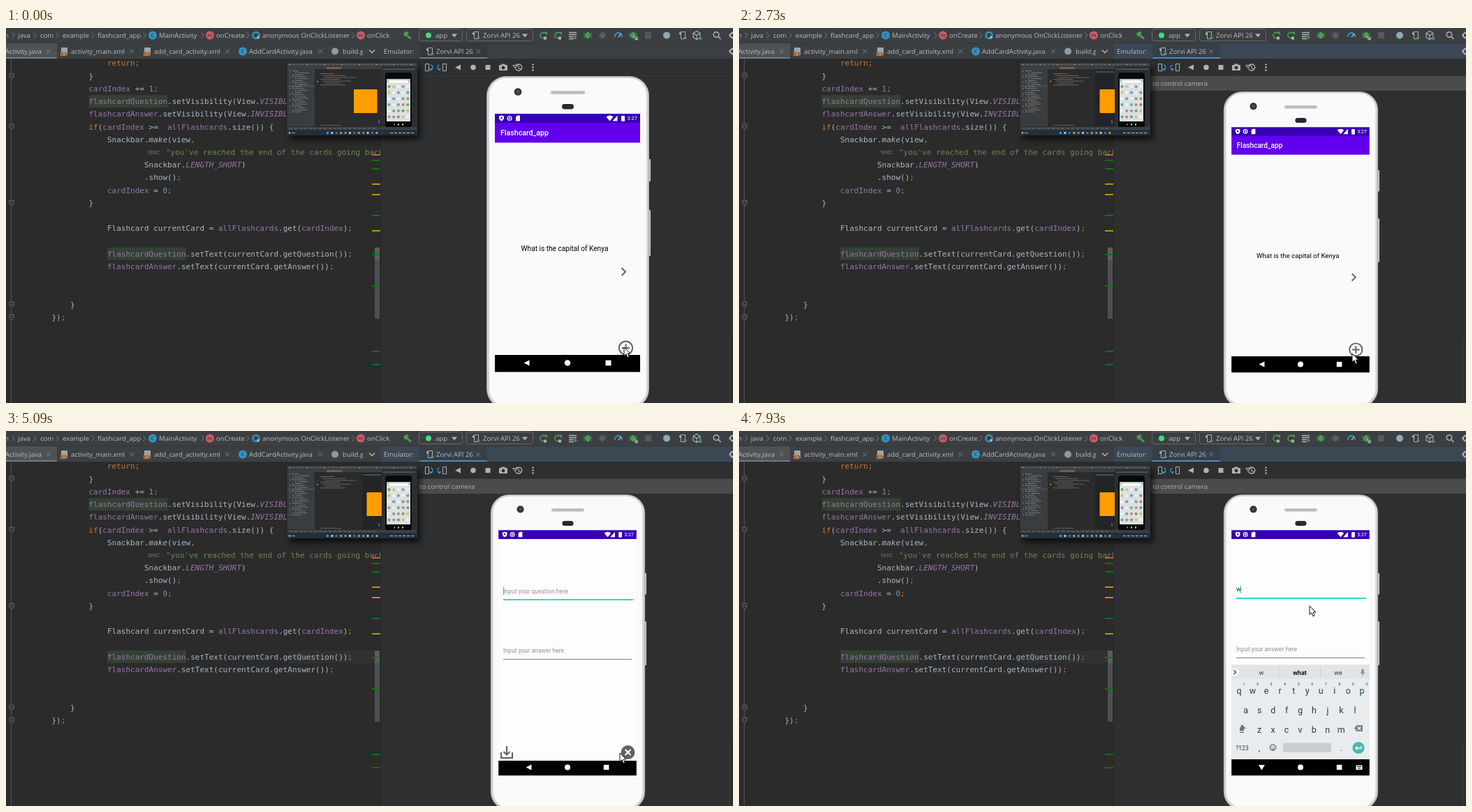
Write an HTML page with a canvas that moves like this. It is 1041 px wide and 538 px high and loops after 8 s.

```html
<!DOCTYPE html>
<html lang="en">
<head>
<meta charset="utf-8">
<style>
html, body { margin: 0; width: 100%; height: 100%; overflow: hidden; background: #2b2b2b; }
canvas { display: block; }
</style>
</head>
<body>
<canvas id="stage" width="1041" height="538"></canvas>
<script>
const c = document.getElementById('stage').getContext('2d');
const UI = '"Open Sans", sans-serif', MONO = '"DejaVu Sans Mono", monospace', APP = 'Roboto, sans-serif';
const LOOP = 8000, DEVICE = 'Zorvi API 26';
const GREY = '#afb1b3', GREEN = '#499c54', BLUE = '#3592c4';

// Held poses: [time, ...values]
const CURSOR = [[0, 885, 458], [1580, 765, 326], [1730, 739, 264], [1880, 738, 244], [2280, 750, 290],
  [2430, 790, 330], [2580, 845, 400], [2730, 878, 467], [2880, 879, 462], [5240, 872, 440],
  [5380, 853, 390], [5520, 833, 330], [5660, 822, 290], [5800, 818, 270], [5930, 817, 263], [6220, 817, 251]];
const FORM = [[4940, 8, .6], [5090, 2, 1], [5240, 0, 1]];
const KEYS = [[6830, 36, .25], [6950, 14, .65], [7100, 2, .95], [7250, 0, 1]];
const held = (list, t) => list.filter(k => k[0] <= t).pop();

function rect(x, y, w, h, color, r = 0) {
  c.fillStyle = color;
  c.beginPath(); c.roundRect(x, y, w, h, r); c.fill();
}
function frame(x, y, w, h, color, r = 0, lw = 1) {
  c.strokeStyle = color; c.lineWidth = lw;
  c.beginPath(); c.roundRect(x, y, w, h, r); c.stroke();
}
function dot(x, y, r, color) {
  c.fillStyle = color;
  c.beginPath(); c.arc(x, y, r, 0, 7); c.fill();
}
function ring(x, y, r, color, lw = 1, from = 0, to = 7) {
  c.strokeStyle = color; c.lineWidth = lw;
  c.beginPath(); c.arc(x, y, r, from, to); c.stroke();
}
// SVG path placed at x, y; stroked when lw is given
function shape(d, x, y, color, lw) {
  const p = new Path2D();
  p.addPath(new Path2D(d), new DOMMatrix([1, 0, 0, 1, x, y]));
  c.lineWidth = lw || 1;
  c.fillStyle = c.strokeStyle = color;
  lw ? c.stroke(p) : c.fill(p);
}
// y is the middle of the capitals
function text(s, x, y, size, color, font = UI, style = '', align = 'left') {
  c.font = `${style} ${size}px ${font}`;
  c.textAlign = align;
  c.fillStyle = color;
  c.fillText(s, x, y + size * .36);
  return c.measureText(s).width;
}
const label = (s, x, y, color = '#bbbbbb') => text(s, x, y, 9.6, color);
const cross = (x, y) => shape('M-3-3L3 3M3-3L-3 3', x, y, '#7f8283', 1);
function badge(ch, x, y, color) {
  dot(x, y, 6, color);
  text(ch, x, y, 8, '#2b2b2b', UI, '', 'center');
}
function phoneIcon(x, y) {
  frame(x - 2.5, y - 5, 6, 10, GREY);
  rect(x - 5, y - 4, 3, 3, GREY);
  dot(x + 3.5, y + 3.5, 2, GREEN);
}
function reload(x, y) {
  ring(x, y, 4, GREEN, 1.6, 1, 5.4);
  shape('M1-5L6-5L6 0Z', x, y, GREEN);
  rect(x + 1, y + 2, 4, 4, GREY);
}
function bug(x, y, color) {
  c.fillStyle = color;
  c.beginPath(); c.ellipse(x, y, 3.4, 4.8, 0, 0, 7); c.fill();
  shape('M-6-3L6 3M-6 0H6M-6 3L6-3', x, y, color, 1);
}
function gear(x, y) {
  ring(x, y, 3.2, GREY, 2);
  shape('M-5 0H-3M3 0H5M0-5V-3M0 3V5', x, y, GREY, 1.5);
}

const TINT = { d: '#a9b7c6', p: '#9876aa', k: '#cc7832', n: '#6897bb', s: '#6a8759', i: '#a9b7c6', c: '#9876aa' };
// [row, x, text]; "~" plus a letter switches the tint
const CODE = [
  [0, 145, '~kreturn;'], [1, 118.5, '~d}'], [2, 118.5, '~pcardIndex~d += ~n1~k;'],
  [3, 118.5, '~pflashcardQuestion~d.setVisibility(View.~cVISIBLE~d)'],
  [4, 118.5, '~pflashcardAnswer~d.setVisibility(View.~cINVISIBLE~d)'],
  [5, 118.5, '~kif~d(~pcardIndex~d >=  ~pallFlashcards~d.size()) {'],
  [6, 145, '~dSnackbar.~imake~d(view~k,'],
  [7, 229, '~s"you\'ve reached the end of the cards going back'],
  [8, 198, '~dSnackbar.~cLENGTH_SHORT~d)'], [9, 198, '~d.show()~k;'],
  [10, 145, '~pcardIndex~d = ~n0~k;'], [11, 118.5, '~d}'],
  [13, 145, '~dFlashcard currentCard = ~pallFlashcards~d.get(~pcardIndex~d)~k;'],
  [15, 145, '~pflashcardQuestion~d.setText(currentCard.getQuestion())~k;'],
  [16, 145, '~pflashcardAnswer~d.setText(currentCard.getAnswer())~k;'],
  [19, 92, '~d}'], [20, 65.5, '~d})~k;']];
const rowY = r => 50.5 + 18.22 * r;

function editor(t) {
  rect(0, 44, 537, 494, '#2b2b2b');
  c.save();
  c.beginPath(); c.rect(0, 44, 536, 494); c.clip();
  if (t >= 3840) rect(405, 315, 123, 18, '#313131');
  rect(7, 44, 1, 494, '#505254');
  for (const r of [1, 5, 11, 19, 20]) {
    rect(4, rowY(r) - 4, 8, 8, '#2b2b2b');
    shape('M-3-3.5H3V1.5L0 4L-3 1.5ZM-1.5 0H1.5', 8, rowY(r), '#6b6d6f', 1);
  }
  rect(118.5, rowY(3) - 9, 113, 18, '#344134');
  rect(145, rowY(15) - 9, 113, 18, '#344134');
  for (const [row, left, line] of CODE) {
    let x = left;
    for (const part of line.split('~').slice(1))
      x += text(part.slice(1), x, rowY(row), 11, TINT[part[0]], MONO, 'ic'.includes(part[0]) ? 'italic' : '');
  }
  text('text:', 203, rowY(7), 8.8, '#787878');
  rect(528, 315, 7, 102, '#4d4f50');
  rect(528, 315, 7, 18, '#5b5d5e');
  c.restore();
  const mark = (ys, color) => ys.forEach(y => rect(524, y - 1, 12, 2, color));
  mark([190, 202, 269, 325, 370, 464, 483], '#0d730f');
  mark([224, 239, 291], '#b8901c');
  mark([182], '#b5653c');
}

function topBars(focused) {
  rect(0, 0, 1041, 44, '#3c3f41');
  rect(0, 21.5, 1041, 1, '#323435');
  const y = 10.5;
  for (const [s, x] of [['n', -2], ['java', 17], ['com', 49], ['example', 81], ['flashcard_app', 131],
    ['MainActivity', 219], ['onCreate', 301], ['anonymous OnClickListener', 367], ['onClick', 517]]) label(s, x, y);
  for (const x of [10, 41, 73, 124, 198, 281, 346, 497]) shape('M-1.5-4L2 0L-1.5 4', x, y, '#7b7e80', 1);
  badge('C', 210, y, BLUE);
  badge('m', 292, y, '#c75d6d');
  badge('m', 508, y, '#c75d6d');
  ring(358, y, 4.5, BLUE, 2.5);
  dot(361, y + 3, 2, '#9fb8c8');

  shape('M-6-3L-1-6L2-3L0-1L6 4L4 6L-2 1L-4 2Z', 575, y, GREEN);
  frame(591.5, 1.5, 62, 17, '#646769', 3);
  dot(605, 10.5, 4, '#3ddc84');
  label('app', 615, y);
  frame(659.5, 1.5, 95, 17, '#646769', 3);
  phoneIcon(673, y);
  label(DEVICE, 683, y);
  for (const x of [642, 743]) shape('M-4-2H4L0 3Z', x, y, GREY);
  reload(769, y);
  reload(790, y);
  shape('M-6-4H5M-6-1H5M-6 2H1M-6 5H1', 812, y, GREY, 1.3);
  shape('M2 0L6 3L2 6Z', 812, y, GREEN);
  bug(833, y, GREEN);
  bug(854, y, '#5b5e60');
  ring(877, 12, 5, BLUE, 2, 3, 6.5);
  shape('M0 1L4-4', 877, 12, GREY, 1.5);
  bug(898, y, GREEN);
  shape('M1 1L6 6M6 2V6H2', 898, y, GREY, 1.3);
  rect(915, 6, 9, 9, '#56595b');
  dot(946, y, 5, '#8fa9b8');
  phoneIcon(969, y);
  shape('M0-6L5-3V3L0 6L-5 3V-3ZM-5-3L0 0L5-3M0 0V6', 989, y, GREY, 1.1);
  shape('M3 1V6M1 4L3 6L6 4', 991, y, BLUE, 1.5);
  ring(1017, 9.5, 3.8, GREY, 1.5);
  shape('M0 0L4 4', 1019.5, 12, GREY, 1.7);
  gear(1040, y);

  const ty = 33.5;
  rect(0, 22, 73, 22, '#4e5254');
  rect(0, 42, 73, 2, '#747a80');
  if (focused) rect(537, 22, 504, 22, '#3b4754');
  rect(592, 22, 97, 22, focused ? '#354049' : '#36393b');
  rect(592, 42, 97, 2, focused ? '#4a88c7' : '#747a80');
  for (const [s, x] of [['Activity.java', -1], ['activity_main.xml', 93], ['add_card_activity.xml', 212],
    ['AddCardActivity.java', 348], ['build.g', 482], ['Emulator:', 541]]) label(s, x, ty);
  for (const x of [61, 180, 317, 450]) cross(x, ty);
  for (const x of [83, 202]) {
    rect(x - 4, 28, 9, 11, '#9aa7b0');
    rect(x - 5, 34, 8, 6, '#c77b3c');
    shape('M-2-2L-4 0L-2 2M2-2L4 0L2 2', x, 37, '#3c3f41', 1);
  }
  badge('C', 339, ty, BLUE);
  dot(471, ty, 5, '#8b9ba4');
  rect(511, 23, 26, 21, '#3c3f41');
  shape('M-4-2L0 2L4-2', 524, ty, '#bbbbbb', 1.4);
  phoneIcon(607, ty);
  label(DEVICE, 616, ty);
  cross(676, ty);
  gear(1040, ty);
}

function emulatorPanel(zoomed) {
  rect(537, 44, 504, 494, '#2d2f31');
  rect(536, 44, 1, 494, '#252728');
  rect(537, 68, 504, 1, '#353739');
  const y = 56.5;
  for (const [x, s] of [[604, 1], [625, -1]]) {
    frame(x - 1.5 + s * -2, 51.5, 5, 10, GREY);
    ring(x + s * 3, y, 4, BLUE, 1.4, s > 0 ? -1.2 : 2, s > 0 ? 1.2 : 4.3);
    shape('M-2-2H2L0 2Z', x + s * 4, 60, BLUE);
  }
  shape('M-4 0L4-4V4Z', 647, y, GREY);
  dot(669, y, 3.8, GREY);
  rect(686.5, 53, 7, 7, GREY);
  rect(706, 53, 12, 8, GREY, 1);
  rect(709.5, 51.5, 5, 3, GREY);
  dot(712, 57, 2.4, '#2d2f31');
  ring(734, y, 4.6, GREY, 1.5, -2.7, 2.7);
  shape('M-8-3L-2-3L-5 1ZM0-3V1L3 2', 734, y, GREY, 1.1);
  for (const d of [-4, 0, 4]) dot(754.5, y + d, 1.3, GREY);
  rect(1036, 445, 1, 93, '#3b3d3f');
  if (zoomed) {
    rect(537, 69, 504, 21, '#494b4c');
    label('to control camera', 592, 80, '#b4b6b7');
  }
}

function statusBar() {
  rect(700, 123, 208, 13.5, '#3700b3');
  shape('M0-4L3.5-3V0Q3 3 0 4Q-3 3-3.5 0V-3Z', 709.5, 129.5, '#fff');
  dot(709.5, 129, 1.3, '#3700b3');
  ring(721, 129.5, 3, '#fff', 1.2);
  dot(721, 129.5, 1.3, '#fff');
  shape('M-1-4H3V4H-3V-2Z', 733, 129.5, '#fff');
  shape('M-5-2Q0-6 5-2L0 4Z', 864.5, 129.5, '#fff');
  shape('M3-4V4H-4Z', 872.5, 129.5, '#fff');
  rect(881, 126, 5, 8, '#fff', 1);
  text('3:27', 889.5, 129.7, 7.6, '#fff', APP);
}

function phone(t) {
  // body
  rect(920, 188, 3, 32, '#c9c7c8', 1);
  rect(920, 261, 3, 66, '#c9c7c8', 1);
  rect(688, 69, 233, 477, '#a5a1a3', 28);
  rect(689, 70, 231, 475, '#d6d3d4', 27);
  rect(692, 72, 225, 470, '#fafafa', 24);
  dot(733, 91.5, 5.3, '#2b2b2d');
  ring(733, 91.5, 3, '#55565a');
  dot(733, 91.5, 1.2, '#777');
  rect(779.5, 90, 50, 5, '#c9c8c9', 2.5);
  for (let x = 783; x < 828; x += 3) rect(x, 91.5, 1.5, 2, '#a5a3a5');
  rect(796, 109, 17, 7.5, '#2a2a2c', 3.7);
  // main screen
  rect(700, 123, 208, 346, t < 3320 ? '#fafafa' : '#fdfdfd');
  statusBar();
  rect(700, 469, 208, 24.4, '#000');
  if (t >= 5090) return;
  rect(700, 136, 208, 28.5, '#6200ee');
  text('Flashcard_app', 708, 150.3, 10.6, '#fff', APP, '500');
  if (t < 3320) text('What is the capital of Kenya', 800, 316.5, 10.15, '#000', APP, '', 'center');
  else text('Nairobi', 804, 323.5, 10.15, '#000', APP, '', 'center');
  shape('M-3-5.5L2.5 0L-3 5.5', 884.5, 349.7, '#6b6b6b', 2.2);
  ring(887.5, 459, 9.6, '#616161', 2);
  shape('M-5.5 0H5.5M0-5.5V5.5', 887.5, 459, '#616161', 2);
}

function form(t) {
  const [, dy, alpha] = held(FORM, t);
  const typed = t >= 6830;
  c.save();
  c.beginPath(); c.rect(705, 155, 198, 316 + dy); c.clip();
  c.globalAlpha = alpha;
  rect(705, 155, 198, 330, '#fdfdfd');
  c.translate(0, dy);
  if (typed) text('w', 712, 226.5, 9, '#222', APP);
  else text('Input your question here', 712, 227.5, 8.65, '#8f8f8f', APP);
  if (t < 7540 || t >= 7930) rect(typed ? 718 : 712, 221.5, 1, 11.5, '#03dac5');
  rect(712, 239, 186, 2, '#2fd8cb');
  text('Input your answer here', 712, 313, 8.65, '#8f8f8f', APP);
  rect(712, 325, 184, 1, '#808080');
  shape('M-8 0V8H8V0M0-9V3M-4.5-1L0 3.5L4.5-1', 717, 459, '#616161', 2);
  dot(890.5, 459, 10, '#616161');
  shape('M-4-4L4 4M4-4L-4 4', 890.5, 459, '#fff', 2);
  c.restore();
}

function keyboard(t) {
  const [, dy, alpha] = held(KEYS, t), ink = '#303b41', sliding = dy > 2;
  c.save();
  c.beginPath(); c.rect(705, 155, 198, 338.5); c.clip();
  c.globalAlpha = alpha;
  c.translate(0, dy);
  rect(705, 335.5, 198, 135.5, sliding ? '#fafbfc' : '#e8ecef');
  rect(705, 335.5, 198, 20, sliding ? '#e6e8e9' : '#e1e4e6');
  dot(710, 346, 6, '#f6f7f8');
  shape('M-1.5-3L1.5 0L-1.5 3', 710, 346, ink, 1.2);
  const key = (s, x, y, size = 12.5, style = '') => text(s, x, y, size, ink, APP, style, 'center');
  key('w', 748, 346.5, 9);
  text('what', 803, 346.5, 9, '#111', APP, 'bold', 'center');
  key('we', 858, 346.5, 9);
  rect(774, 340, 1, 12, '#c9ced1');
  rect(832, 340, 1, 12, '#c9ced1');
  rect(891.5, 341.5, 3, 6, '#78828a', 1.5);
  shape('M-3 0Q0 5 3 0M0 3V5', 893, 346, '#78828a', 1);
  [['qwertyuiop', 716, 371], ['asdfghjkl', 725.6, 399], ['zxcvbnm', 745, 427]].forEach(([row, x, y]) =>
    [...row].forEach((ch, i) => key(ch, x + i * 19.55, y + 1)));
  for (let i = 0; i < 10; i++) key((i + 1) % 10, 723 + i * 19.55, 363, 5.5);
  shape('M0-6L6 0H3V3H-3V0ZM-3 4.5H3V6H-3Z', 720, 427, '#68737a');
  shape('M-6 0L-2.5-4.5H6V4.5H-2.5Z', 887, 426.5, '#7b858b');
  shape('M-1-2L3 2M3-2L-1 2', 887, 426.5, '#fff', 1.1);
  key('?123', 720.5, 454.5, 8.5);
  key(',', 745, 455, 12);
  key('.', 862, 455, 12);
  ring(764.5, 454, 4.3, ink);
  ring(764.5, 454.5, 2.2, ink, 1, .3, 2.8);
  dot(763, 452.7, .7, ink);
  dot(766, 452.7, .7, ink);
  rect(779, 447.5, 69, 13.5, '#c9ced2', 1);
  dot(887, 454.5, 8.6, '#4db6ac');
  shape('M4-3V0H-4M-1.5-2.5L-4 0L-1.5 2.5', 887, 455, '#fff', 1.3);
  c.restore();
}

function navIcons(x, y, s, typed) {
  shape(typed ? 'M-4.5-3.5H4.5L0 4Z' : 'M-4 0L4-4V4Z', x - 58.5 * s, y, '#fff');
  dot(x, y, 4.2 * s, '#fff');
  rect(x + 54.5 * s, y - 3.8 * s, 8 * s, 7.6 * s, '#fff');
  if (!typed) return;
  rect(883.5, y - 3, 9, 6.5, '#fff', 1);
  rect(885, y - 1.5, 6, 1, '#000');
  rect(886, y + 1, 4, 1, '#000');
}

function preview(t) {
  c.save();
  c.shadowColor = '#000a'; c.shadowBlur = 8; c.shadowOffsetX = 4; c.shadowOffsetY = 6;
  rect(402, 50, 187, 104, '#2b2d2f', 1);
  c.restore();
  rect(403, 50.5, 185, 4, '#44484a');
  rect(403, 55, 135, 4, '#3c3f41');
  rect(403, 59, 39, 82, '#3a3d3f');
  rect(403, 82, 39, 3, '#434b53');
  rect(443, 59, 95, 82, '#2b2b2b');
  rect(459, 56, 22, 3, '#7a5a40');
  for (let i = 0; i < 29; i++) rect(405 + i * 6.2, 52, 3, 1, i % 4 ? '#63686c' : '#8d9296');
  for (let i = 0; i < 22; i++) {
    const x = 406 + i * 5 % 3 * 4;
    rect(x, 61 + i * 2.8, 2, 1.3, i % 3 ? '#9a744e' : '#5d7484');
    rect(x + 4, 61 + i * 2.8, 9 + i * 7 % 11, 1, '#74797c');
  }
  for (let i = 0; i < 7; i++) rect(450 + i % 3 * 3, 65 + i * 2.7, 20 + i * 13 % 31, 1, i % 3 ? '#5c666d' : '#78624a');
  rect(445, 76, 2, 1.5, '#c0a040');
  rect(450, 139, 30, 1, '#5a5e61');
  if (t < 730) rect(498, 88, 33.5, 34, '#ff9d00', 1);
  else {
    rect(510, 60, 28, 81, '#222426');
    rect(511, 62, 26, 2, '#4a4e51');
    rect(516.5, 88, 21.5, 34, '#ff9d00', 1);
  }
  rect(533, 132, 2, 5, '#54585b');
  rect(538, 55, 50, 90, '#2c2f32');
  rect(540, 58, 46, 2, '#4d5154');
  rect(543, 64, 38, 79, '#08090a', 4);
  rect(545, 73, 34, 61, '#dde0df');
  rect(545, 73, 34, 5, '#c0c5c3');
  rect(548, 75, 28, 3.5, '#fff', 1.5);
  const hues = ['#5fa67a', '#6d9fc6', '#d08078', '#f4f4f4', '#5fae9f', '#dcbd70', '#eef0f2'];
  for (let i = 0; i < 30; i++) dot(548.5 + i % 5 * 6.7, 84 + Math.floor(i / 5) * 8.7, 2.1, hues[(i * 5 + Math.floor(i / 5)) % 7]);
  shape('M-7 0L-5-1V1ZM-1-1H1V1H-1ZM5-1H7V1H5Z', 562, 138.5, '#ddd');
  rect(403, 142, 185, 4, '#3c3f41');
  for (let i = 0; i < 18; i++) rect(406 + i * 7, 143.5, 4, 1, '#686d70');
  rect(402, 147, 187, 7, '#20303e');
  dot(406, 150.5, 1.4, '#d7a940');
  rect(409, 150, 5, 1, '#99a5ae');
  for (let i = 0; i < 12; i++) rect(459 + i * 6.4, 149, 3, 3, ['#4aa3df', '#c5ced5', '#4f76a3', '#d79a48'][i % 4], 1);
  for (let i = 0; i < 6; i++) rect(550 + i * 6, 150, 4, 1, '#b9c3ca');
}

function draw(t) {
  const zoomed = t >= 1580, typed = t >= 6830;
  editor(t);
  emulatorPanel(zoomed);
  c.save();
  if (zoomed) c.transform(.95, 0, 0, .95, 804 * .05, 25.4);
  phone(t);
  c.restore();
  if (t >= 4940) form(t);
  if (typed) keyboard(t);
  if (zoomed) navIcons(804, 482.5, .95, typed);
  else navIcons(804, 480.5, 1, false);
  topBars(zoomed);
  preview(t);
  const [, x, y] = held(CURSOR, t), arrow = 'M0 0V12.5L3 9.8L5 14.8L7.2 13.8L5.1 9H9Z';
  shape(arrow, x, y, '#fff');
  shape(arrow, x, y, '#111', 1);
}

const start = performance.now();
function tick(now) {
  draw(Math.max(0, now - start) % LOOP);
  requestAnimationFrame(tick);
}
draw(0);
requestAnimationFrame(tick);
</script>
</body>
</html>
```
